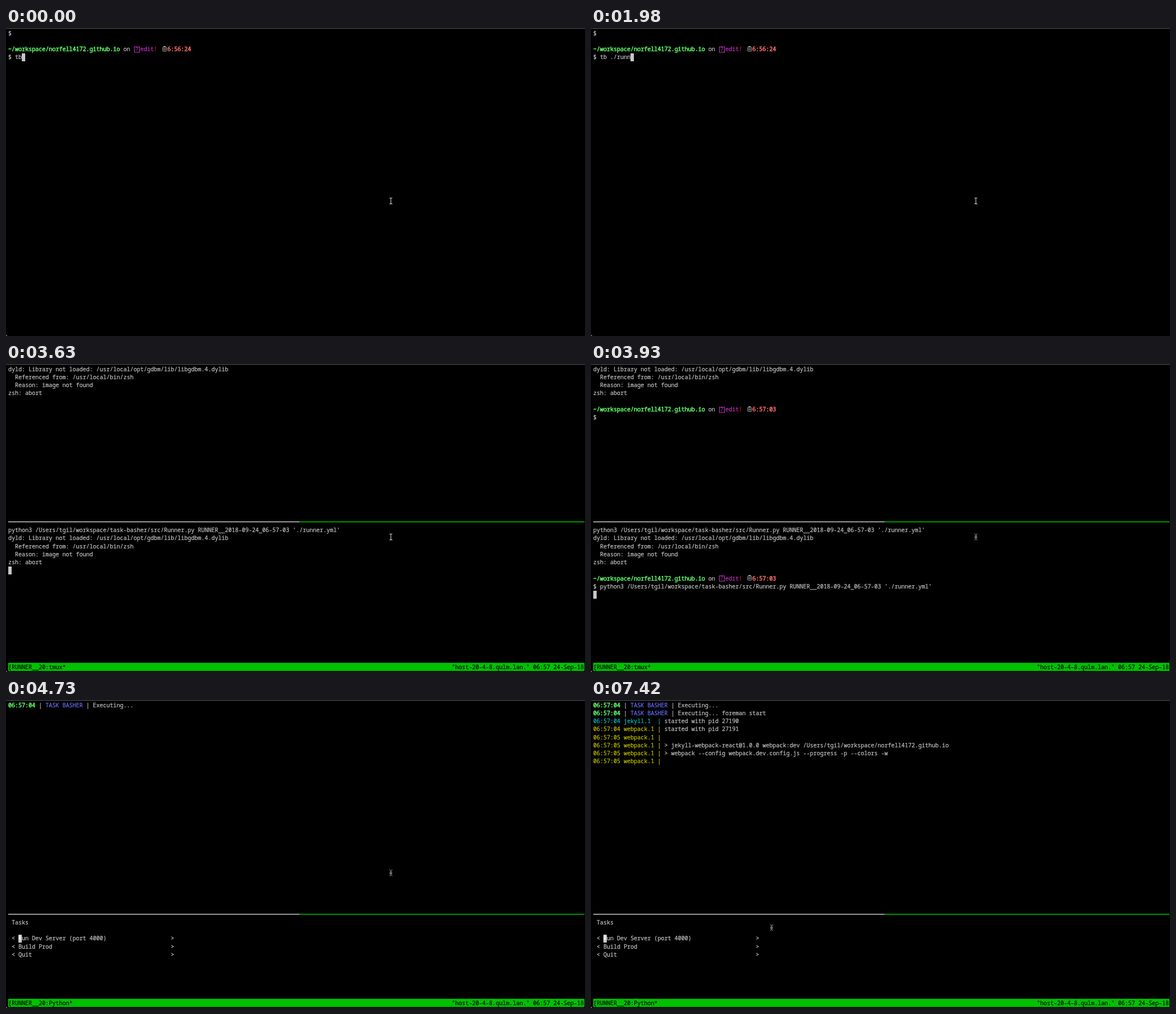
Animation of 1026 by 546 pixels, one loop 8000 ms. Source, as an HTML page:

```html
<!DOCTYPE html>
<html lang="en">
<head>
<meta charset="utf-8">
<title>Terminal task runner</title>
<style>
  html, body { margin: 0; width: 100%; height: 100%; overflow: hidden; background: #000; }
  svg { display: block; }
  text { font: 10px "Noto Sans Mono", "DejaVu Sans Mono", monospace; white-space: pre; stroke-width: .18px; }
  .b { stroke-width: .55px; }
</style>
</head>
<body>
<svg id="stage" width="1026" height="546" viewBox="0 0 1026 546"></svg>
<script>
const LOOP = 8000, CELL = 6, LINE = 14.27, LEFT = 4, TOP = 2.2;
const FG = '#c7c7c7', GREEN = '#00c200', LIME = '#5ffa68', YELLOW = '#c7c400', CYAN = '#00c5c7',
      BLUE = '#6871ff', MAGENTA = '#ca30c7', RED = '#c91b00', CORAL = '#ff6e67';
const USER = 'tgil', SITE = 'norfell4172.github.io', HOST = 'host-20-4-8.qulm.lan.';
const RUN = `python3 /Users/${USER}/workspace/task-basher/src/Runner.py RUNNER__2018-09-24_06-57-03 './runner.yml'`;
const COMMAND = 'tb ./runner.yml';

const colX = c => LEFT + c * CELL;
const rowY = r => TOP + r * LINE;
const escapeText = s => s.replace(/&/g, '&amp;').replace(/</g, '&lt;');
const rect = (x, y, w, h, fill) => `<rect x="${x}" y="${y}" width="${w}" height="${h}" fill="${fill}"/>`;

// A thin stroke stands in for the terminal's font smoothing; a thicker one for bold.
function put(row, col, text, color = FG, bold = false) {
  return `<text x="${colX(col)}" y="${(rowY(row) + 10.4).toFixed(2)}" fill="${color}" stroke="${color}"` +
    `${bold ? ' class="b"' : ''}>${escapeText(text)}</text>`;
}

const block = (row, col) => rect(colX(col), Math.round(rowY(row)), CELL, 14, FG);

function prompt(row, time) {
  const y = Math.round(rowY(row));
  return put(row, 0, '~/workspace/' + SITE, LIME, true) + put(row, 34, 'on') +
    `<rect x="227.5" y="${y + 2.5}" width="9" height="9.5" fill="none" stroke="${MAGENTA}"/>` +
    `<text x="229.6" y="${y + 10}" fill="${MAGENTA}" style="font-size:8px">?</text>` +
    put(row, 39, 'edit', MAGENTA) + put(row, 43, '!', RED) +
    `<rect x="277.5" y="${y + 2.5}" width="7" height="8" rx="1.5" fill="#333" stroke="#777"/>` +
    rect(279, y + 1, 4, 2, '#999') + rect(279, y + 6, 4, 1, '#888') +
    put(row, 47, time, CORAL, true);
}

function abortLog(row) {
  return ['dyld: Library not loaded: /usr/local/opt/gdbm/lib/libgdbm.4.dylib',
    '  Referenced from: /usr/local/bin/zsh',
    '  Reason: image not found',
    'zsh: abort'].map((s, i) => put(row + i, 0, s)).join('');
}

function tmux(dividerRow, program) {
  const y = Math.round(rowY(dividerRow) + 6);
  return rect(4, y, 516, 1.5, FG) + rect(520, y, 505, 1.5, GREEN) +
    rect(4, 529.7, 1021, 14.6, GREEN) +
    put(37, 0, `[RUNNER__20:${program}*`, '#000') +
    put(37, 131, `"${HOST}" 06:57 24-Sep-18`, '#000');
}

function basher(row, time, extra = '') {
  return put(row, 0, time, LIME, true) + put(row, 9, '|') +
    put(row, 11, 'TASK BASHER', BLUE) + put(row, 23, '| Executing... ' + extra);
}

function service(row, time, name, color, text = '') {
  return put(row, 0, `${time} ${name.padEnd(9)} |`, color) + put(row, 21, text);
}

function menu() {
  const items = ['Run Dev Server (port 4000)', 'Build Prod', 'Quit'];
  return tmux(26, 'Python') + put(27, 1, 'Tasks') +
    items.map((s, i) => put(29 + i, 1, '< ' + s) + put(29 + i, 48, '>')).join('') +
    block(29, 3) + put(29, 3, 'R', '#fff');
}

function shell(typed) {
  return put(0, 0, '$') + prompt(2, '6:56:24') +
    put(3, 0, '$ ' + COMMAND.slice(0, typed)) + block(3, 2 + typed);
}

function split(ready) {
  const base = abortLog(0) + tmux(19, 'tmux') + put(20, 0, RUN) + abortLog(21);
  if (!ready) return base + block(25, 0);
  return base + prompt(5, '6:57:03') + put(6, 0, '$') +
    prompt(26, '6:57:03') + put(27, 0, '$ ' + RUN) + block(28, 0);
}

function setup(entered) {
  return abortLog(0) + prompt(5, '6:57:03') +
    put(6, 0, '$ PS1=$(echo -e "\\e[1m\\e[32m\\$(date +%H:%M:%S)\\e[0m | \\e[94mTASK BASHER\\e[0m | Executing... ")') +
    basher(7, '06:57:03') + (entered ? basher(8, '06:57:04') : '') + menu();
}

// Output arrives in batches: command, process ids, webpack log.
function server(stage) {
  const t4 = '06:57:04', t5 = '06:57:05', pack = (row, text) => service(row, t5, 'webpack.1', YELLOW, text);
  let out = basher(0, t4) + menu();
  if (stage > 0) out += basher(1, t4, 'foreman start');
  if (stage > 1) out += service(2, t4, 'jekyll.1', CYAN, 'started with pid 27190') +
    service(3, t4, 'webpack.1', YELLOW, 'started with pid 27191');
  if (stage > 2) out += pack(4) +
    pack(5, `> jekyll-webpack-react@1.0.0 webpack:dev /Users/${USER}/workspace/${SITE}`) +
    pack(6, '> webpack --config webpack.dev.config.js --progress -p --colors -w') + pack(7);
  return out;
}

const typing = [[0, 2], [150, 3], [930, 4], [1080, 5], [1380, 6], [1530, 7], [1680, 8],
  [1980, 9], [2130, 11], [2280, 12], [2580, 13], [2880, 15]];
const screens = [
  ...typing.map(([t, n]) => [t, () => shell(n)]),
  [3630, () => split(false)], [3930, () => split(true)],
  [4100, () => setup(false)], [4550, () => setup(true)],
  [4730, () => server(0)], [5180, () => server(1)], [5320, () => server(2)], [5620, () => server(3)]
];
const pointer = [[0, 682, 306.5], [7120, 585, 331.5], [7270, 462, 362.5], [7420, 320, 403.5]];

const at = (steps, t) => steps.filter(s => s[0] <= t).pop();

function ibeam(x, y, marked) {
  const beam = 'M-2.5-5.5Q0-5.5 0-3.5Q0-5.5 2.5-5.5M0-3.5V3.5M-2.5 5.5Q0 5.5 0 3.5Q0 5.5 2.5 5.5';
  const cross = 'M-2.5-6L0-3L2.5-6M-1-3V3M1-3V3M-2.5 6L0 3L2.5 6M-2.5 .5H2.5';
  return `<path transform="translate(${x} ${y})" d="${marked ? cross : beam}" fill="none" ` +
    `stroke="${marked ? '#b0b0b0' : '#d0d0d0'}" stroke-width="${marked ? 0.9 : 1.1}"/>`;
}

const stage = document.getElementById('stage');
const frame = rect(0, 0, 1026, 546, '#000') + rect(0, 0, 1026, 1, '#5c5c5c') +
  '<path d="M0 543.5V546H2.5Z" fill="#888"/>';
let shown = '';

function draw(now) {
  const t = now % LOOP;
  const screen = at(screens, t), [moved, x, y] = at(pointer, t);
  const key = screen[0] + '/' + moved;
  if (key !== shown) {
    stage.innerHTML = frame + screen[1]() + ibeam(x, y, t >= 3930);
    shown = key;
  }
  requestAnimationFrame(() => draw(performance.now() - start));
}
const start = performance.now();
draw(0);
</script>
</body>
</html>
```
